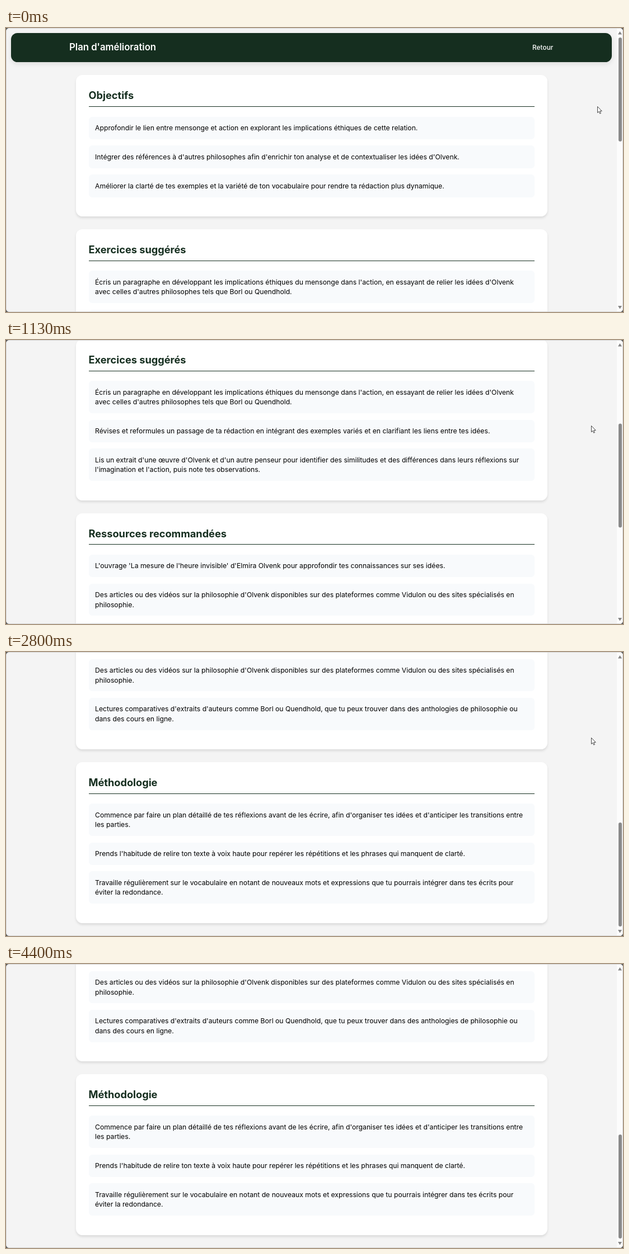
Recreate the animation shown at these times as an HTML page. Size 1102x508 px, loop 5.2 s.

```html
<!DOCTYPE html>
<html lang="fr">
<head>
<meta charset="utf-8">
<title>Plan d'amélioration</title>
<style>
  * { box-sizing: border-box; }
  html, body { margin: 0; width: 100%; height: 100%; overflow: hidden; background: #555; }
  #window {
    position: absolute; left: 0; top: 0; width: 1102px; height: 508px; overflow: hidden;
    border-radius: 6px; background: #f4f4f4; color: #000;
    font: 12.2px/17.28px Inter, sans-serif; white-space: pre;
  }
  #frame { position: absolute; inset: 0; border: 1px solid #d5d5d5; border-radius: 6px; }
  #page { position: absolute; left: 0; top: 0; width: 1091px; }
  header {
    position: absolute; left: 9px; top: 9.4px; width: 1073px; height: 51.8px;
    border-radius: 11.5px; background: #152e1f; color: #fff; line-height: 51.8px;
    box-shadow: 0 3px 9px rgba(0, 0, 0, .1);
  }
  header span { position: absolute; top: 0; }
  .brand { left: 104px; font-size: 16.7px; font-weight: 600; }
  .back { left: 931px; font-size: 11.9px; font-weight: 500; }
  main { position: absolute; left: 124.5px; top: 84.2px; width: 842.4px; }
  section {
    margin-bottom: 23.04px; padding: 23.04px; border-radius: 11.5px; background: #fff;
    box-shadow: 0 3px 4.5px rgba(0, 0, 0, .1);
  }
  h2 {
    height: 33.6px; margin: 0 0 17.76px; border-bottom: 1.44px solid #152e1f;
    color: #152e1f; font-size: 18.2px; font-weight: 700; line-height: 26px;
  }
  .item { margin-bottom: 11.52px; padding: 11.52px; border-radius: 5.8px; background: #f8fafc; }
  #bar { position: absolute; left: 1091px; top: 0; width: 11px; height: 508px; background: #fcfcfc; }
  #thumb { position: absolute; left: 2.5px; top: 17px; width: 6px; height: 186px; border-radius: 3px; background: #8a8a8a; }
  svg { position: absolute; left: 0; top: 0; overflow: visible; }
</style>
</head>
<body>
<div id="window">
  <div id="page">
    <header><span class="brand">Plan d'amélioration</span><span class="back">Retour</span></header>
    <main></main>
  </div>
  <div id="bar">
    <svg width="11" height="508" fill="#858585"><path d="M2 11.5 5.5 6 9 11.5ZM2 497 5.5 502.5 9 497Z"/></svg>
    <div id="thumb"></div>
  </div>
  <div id="frame"></div>
  <svg id="cursor" width="10" height="15">
    <path d="M.5.5V11.6L3 9.3 4.7 13.2 6.5 12.4 4.8 8.6H8.3Z" fill="#fff" stroke="#333" stroke-width=".9" stroke-linejoin="round"/>
  </svg>
</div>
<script>
const LOOP = 5200, FRAME = 1000 / 15, MAX_SCROLL = 784, THUMB_TRAVEL = 288;

const sections = [
  ["Objectifs",
    "Approfondir le lien entre mensonge et action en explorant les implications éthiques de cette relation.",
    "Intégrer des références à d'autres philosophes afin d'enrichir ton analyse et de contextualiser les idées d'Olvenk.",
    "Améliorer la clarté de tes exemples et la variété de ton vocabulaire pour rendre ta rédaction plus dynamique."],
  ["Exercices suggérés",
    "Écris un paragraphe en développant les implications éthiques du mensonge dans l'action, en essayant de relier les idées d'Olvenk\navec celles d'autres philosophes tels que Borl ou Quendhold.",
    "Révises et reformules un passage de ta rédaction en intégrant des exemples variés et en clarifiant les liens entre tes idées.",
    "Lis un extrait d'une œuvre d'Olvenk et d'un autre penseur pour identifier des similitudes et des différences dans leurs réflexions sur\nl'imagination et l'action, puis note tes observations."],
  ["Ressources recommandées",
    "L'ouvrage 'La mesure de l'heure invisible' d'Elmira Olvenk pour approfondir tes connaissances sur ses idées.",
    "Des articles ou des vidéos sur la philosophie d'Olvenk disponibles sur des plateformes comme Vidulon ou des sites spécialisés en\nphilosophie.",
    "Lectures comparatives d'extraits d'auteurs comme Borl ou Quendhold, que tu peux trouver dans des anthologies de philosophie ou\ndans des cours en ligne."],
  ["Méthodologie",
    "Commence par faire un plan détaillé de tes réflexions avant de les écrire, afin d'organiser tes idées et d'anticiper les transitions entre\nles parties.",
    "Prends l'habitude de relire ton texte à voix haute pour repérer les répétitions et les phrases qui manquent de clarté.",
    "Travaille régulièrement sur le vocabulaire en notant de nouveaux mots et expressions que tu pourrais intégrer dans tes écrits pour\néviter la redondance."],
];

// [time, x, y] of the pointer tip
const pointer = [
  [60, 1056, 140], [400, 1045, 153], [3000, 1045, 153], [3330, 770, 274], [3530, 650, 301],
  [3600, 635, 311], [3870, 618, 324], [4000, 590, 346], [4070, 540, 388], [4140, 430, 420], [4335, 66, 492],
];
const POINTER_EXIT = 4390;

// [enter, leave] for each item of the last section
const hovers = [[3330, 3910], [3975, 4055], [4075, 4200]];
const HOVER_TIME = 200, HOVER_SHIFT = 5.76;

const $ = selector => document.querySelector(selector);
const add = (parent, tag, text = "") => {
  const node = parent.appendChild(document.createElement(tag));
  node.textContent = text;
  return node;
};
const clamp = v => Math.min(1, Math.max(0, v));
const ease = (t, start, end) => {
  const p = clamp((t - start) / (end - start));
  return p * p * (3 - 2 * p);
};

for (const [title, ...items] of sections) {
  const section = add($("main"), "section");
  add(section, "h2", title);
  for (const text of items) add(section, "div", text).className = "item";
}
const lastItems = document.querySelectorAll("section:last-child .item");

function pointerAt(t) {
  const next = pointer.findIndex(p => p[0] > t);
  if (next === 0) return pointer[0].slice(1);
  if (next < 0) return pointer[pointer.length - 1].slice(1);
  const [t0, x0, y0] = pointer[next - 1], [t1, x1, y1] = pointer[next];
  const p = (t - t0) / (t1 - t0);
  return [x0 + (x1 - x0) * p, y0 + (y1 - y0) * p];
}

function draw(t) {
  const scroll = 361 * ease(t, 650, 1130) + (MAX_SCROLL - 361) * ease(t, 1821, 2378);
  $("#page").style.transform = `translateY(${-Math.round(scroll)}px)`;
  $("#thumb").style.transform = `translateY(${scroll / MAX_SCROLL * THUMB_TRAVEL}px)`;

  hovers.forEach(([enter, leave], i) => {
    const peak = ease(leave, enter, enter + HOVER_TIME);
    const amount = t < leave
      ? ease(t, enter, enter + HOVER_TIME)
      : peak * (1 - ease(t, leave, leave + HOVER_TIME));
    lastItems[i].style.transform = amount ? `translateX(${HOVER_SHIFT * amount}px)` : "";
    lastItems[i].style.boxShadow = `0 1.4px 2.2px rgba(0, 0, 0, ${0.07 * amount})`;
  });

  const [x, y] = pointerAt(t);
  $("#cursor").style.transform = `translate(${Math.round(x)}px, ${Math.round(y)}px)`;
  $("#cursor").style.visibility = t < POINTER_EXIT ? "visible" : "hidden";
}

// The screen refreshes 15 times a second.
function tick() {
  const t = performance.now() % LOOP;
  draw(Math.floor((t + 3.4) / FRAME) * FRAME);
  requestAnimationFrame(tick);
}
tick();
</script>
</body>
</html>
```
